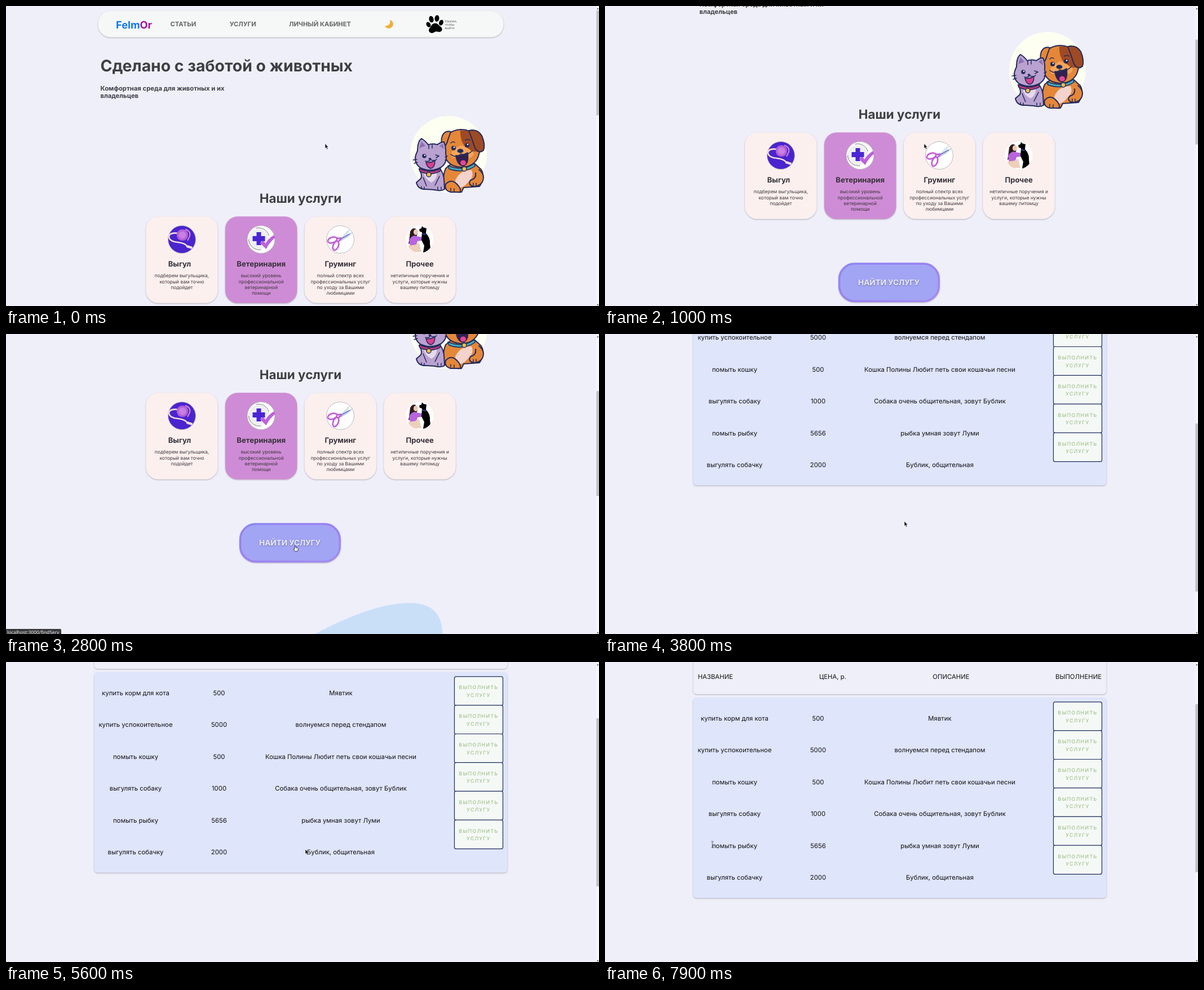
An HTML page that plays this animation: 1052x532 px, repeating every 8000 ms.

```html
<!DOCTYPE html>
<html lang="ru">
<head>
<meta charset="utf-8">
<title>Сервис для животных</title>
<style>
@property --s { syntax: "<number>"; inherits: true; initial-value: 0; }
@property --x { syntax: "<number>"; inherits: true; initial-value: 566; }
@property --y { syntax: "<number>"; inherits: true; initial-value: 244; }

html, body { margin: 0; width: 100%; height: 100%; overflow: hidden; background: #efeffa; }
svg { display: block; width: 1052px; height: 532px; animation: scroll 8s step-end infinite, point 8s step-end infinite; }
text { font-family: Inter, sans-serif; text-rendering: geometricPrecision; }
.b { font-weight: 700; }
.m { text-anchor: middle; }
.page { transform: translateY(calc(var(--s) * -1px)); }
.cursor { transform: translate(calc(var(--x) * 1px), calc(var(--y) * 1px)); }
.card { filter: drop-shadow(0 1.8px 1.1px #0004); }
.ink { stroke: #212a5c; stroke-width: 2; stroke-linejoin: round; stroke-linecap: round; }
.thin { stroke-width: 1.5; }
.line { fill: none; }
#home, #list, #arrow, #hand, #beam, #status { animation: 8s step-end infinite; }
#home { animation-name: home; }
#list { animation-name: list; }
#arrow { animation-name: arrow; }
#hand { animation-name: hand; }
#beam { animation-name: beam; }
#status { animation-name: status; }
#home .thumb { transform: translateY(calc(var(--s) * .3465px)); }
#list .thumb { transform: translateY(calc(var(--s) * .56px)); }

/* the picture advances in 100 ms ticks */
@keyframes scroll {
  0% { --s: 0; }
  8.75% { --s: 0; animation-timing-function: steps(4, start); }
  13.75% { --s: 149; }
  15% { --s: 149; animation-timing-function: steps(4, start); }
  20% { --s: 269; }
  51.25% { --s: 269; animation-timing-function: steps(5, start); }
  57.5% { --s: 179; }
  70% { --s: 179; animation-timing-function: steps(4, start); }
  75%, 100% { --s: 119; }
}
@keyframes point {
  0% { --x: 566; --y: 244; }
  20% { --x: 566; --y: 244; animation-timing-function: steps(4, start); }
  25% { --x: 536; --y: 408; }
  26.25% { --x: 536; --y: 408; animation-timing-function: steps(3, start); }
  30% { --x: 513; --y: 375; }
  45% { --x: 513; --y: 375; animation-timing-function: steps(3, start); }
  48.75% { --x: 531; --y: 332; }
  92.5% { --x: 531; --y: 332; animation-timing-function: steps(3, start); }
  96.25% { --x: 370; --y: 288; animation-timing-function: steps(3, start); }
  100% { --x: 190.5; --y: 323.5; }
}
@keyframes home { 0% { visibility: visible; } 37.5%, 100% { visibility: hidden; } }
@keyframes list { 0% { visibility: hidden; } 37.5%, 100% { visibility: visible; } }
@keyframes arrow {
  0%, 37.5%, 90% { opacity: 1; }
  26.25%, 77.5%, 98.75%, 100% { opacity: 0; }
}
@keyframes hand { 0%, 37.5%, 100% { opacity: 0; } 26.25% { opacity: 1; } }
@keyframes beam { 0%, 90% { opacity: 0; } 77.5%, 98.75%, 100% { opacity: 1; } }
@keyframes status {
  0%, 42.5%, 100% { opacity: 0; }
  26.25%, 41.25% { opacity: .5; }
  27.5% { opacity: 1; }
}
</style>
</head>
<body>
<svg viewBox="0 0 1052 532">
  <defs>
    <linearGradient id="rim" x1="0" y1="0" x2="1" y2="1">
      <stop stop-color="#8c87f3"/><stop offset=".5" stop-color="#9c80f2"/><stop offset="1" stop-color="#a48cf2"/>
    </linearGradient>
    <clipPath id="disc"><circle r="24"/></clipPath>
  </defs>
  <rect width="1052" height="532" fill="#efeffa"/>

  <g id="home">
    <g class="page">
      <rect class="card" x="163.5" y="9" width="719" height="46.5" rx="22" fill="#f5f8f6"/>
      <text class="b" x="195" y="39.5" font-size="18.2" fill="#1479e6">Felm<tspan fill="#a3109f">Or</tspan></text>
      <g id="nav" fill="#666668"></g>
      <path d="M681 24.6A7.7 7.7 0 1 1 672 35C678 36.5 683.5 31 681 24.6Z" fill="#f3ae38"/>
      <g id="paw">
        <path d="M759 31C764 29 767 33 770 36C776 39 774 47 768 46C764 45 762 45 759 47C753 50 748 45 751 40C754 37 754 33 759 31Z"/>
        <ellipse cx="749.5" cy="33" rx="3.6" ry="5" transform="rotate(-30 749.5 33)"/>
        <ellipse cx="754.5" cy="23.5" rx="4" ry="5.8" transform="rotate(-14 754.5 23.5)"/>
        <ellipse cx="764.5" cy="22" rx="4" ry="5.8" transform="rotate(6 764.5 22)"/>
        <ellipse cx="772" cy="29.5" rx="3.7" ry="5.2" transform="rotate(24 772 29.5)"/>
      </g>

      <g id="pets">
        <circle cx="785" cy="263" r="68" fill="#fdfff1"/>
        <path class="ink" d="M780 288C774 302 775 320 782 326Q790 331 808 330L812 322L840 320Q851 304 843 290L832 280H790Z" fill="#e58738"/>
        <path d="M797 309Q806 290 826 291Q831 303 820 312Q810 325 799 322Z" fill="#f3d3cc"/>
        <path class="ink" d="M780 316Q790 305 801 317Q807 323 806 330H789Q777 327 780 316ZM839 290Q851 300 845 312Q840 320 829 320Q819 317 824 309Q835 306 833 296" fill="#e58738"/>
        <path class="ink line thin" d="M789 323v5M795 324v5M829 314v5M834 314v4"/>
        <path class="ink" d="M777 241Q782 221 806 219Q828 219 837 236Q844 255 836 271Q827 286 808 286Q787 285 780 270Q773 254 777 241Z" fill="#e58738"/>
        <path d="M806 221Q828 219 835 236Q840 248 837 258Q824 260 814 249Q805 237 806 221Z" fill="#9e4a25"/>
        <path class="ink" d="M821 221Q836 217 844 230Q851 246 847 256Q839 263 832 252Q827 236 821 221Z" fill="#9e4a25"/>
        <path class="ink" d="M789 223Q779 220 774 230Q770 241 776 250Q782 247 784 237Z" fill="#e58738"/>
        <path d="M806 247Q818 249 830 261Q828 271 815 270L807 264L793 270Q786 264 794 255Z" fill="#f4a65a"/>
        <path class="ink thin" d="M798 265Q809 266 819 260Q822 280 811 284Q800 282 798 265Z" fill="#322050"/>
        <ellipse cx="811" cy="278" rx="5" ry="4.5" fill="#e8459a"/>
        <path class="ink line thin" d="M789 263Q798 271 807 262Q816 267 827 257M789 243q4-4 7-1M815 238q5-3 8 0"/>
        <ellipse cx="806" cy="257" rx="5.5" ry="3.7" fill="#212a5c"/>
        <circle cx="794" cy="252" r="4" fill="#212a5c"/><circle cx="818" cy="247" r="4" fill="#212a5c"/>
        <circle cx="795" cy="250.5" r="1.3" fill="#fff"/><circle cx="819" cy="245.5" r="1.3" fill="#fff"/>
        <path class="ink thin" d="M784 283Q811 294 831 279L832 284Q812 298 786 289Z" fill="#43a8bb"/>
        <circle class="ink thin" cx="813" cy="289" r="4" fill="#f5bd45"/>

        <path class="ink" d="M733 290Q739 299 736 306L728 313Q731 326 746 325L761 326Q772 329 778 325L777 306Q775 295 771 290Z" fill="#b9a2cf"/>
        <path d="M741 296Q753 302 764 296Q765 307 755 313Q743 307 741 296Z" fill="#e5d9ee"/>
        <path class="ink line thin" d="M740 304l6 15M769 302l-8 16M737 320v4M742 321v4M766 321v4M772 321v4"/>
        <path class="ink" d="M730 257Q730 240 737 235Q744 239 749 246Q757 243 765 246Q771 241 777 241Q781 250 780 262Q784 277 772 286Q753 296 735 287Q720 276 730 257Z" fill="#b9a2cf"/>
        <path d="M733 252L737 240L744 248ZM769 248L775 244L777 254Z" fill="#8d70b1"/>
        <path class="ink line thin" d="M750 247v6M756 246v6M722 273l7-1M724 279l6-2M779 268l4-2M779 273l4 1M762 264l6 2-5 3M744 275Q750 277 753 272Q758 276 764 272"/>
        <circle cx="742" cy="266" r="3.7" fill="#212a5c"/><circle cx="743" cy="264.8" r="1.2" fill="#fff"/>
        <path class="ink thin" d="M745 277Q753 279 761 274Q761 286 754 288Q747 287 745 277Z" fill="#d9408f"/>
        <ellipse cx="752" cy="271" rx="2.5" ry="1.7" fill="#212a5c"/>
        <path class="ink thin" d="M733 288Q753 298 771 288L770 293Q752 302 734 293Z" fill="#c63b7a"/>
        <circle class="ink thin" cx="750" cy="299" r="4" fill="#f5bd45"/>
      </g>

      <g id="heads" fill="#3f3f43"></g>
      <g id="cards"></g>

      <g transform="translate(312 414)">
        <circle r="24.5" fill="#4a24cf" stroke="#b9b9bd"/>
        <path d="M-6-11Q-23-13-23-4Q-21 4-7 5Q7 7 9 12L17 15" fill="none" stroke="#f4dcd7" stroke-width="2.6"/>
        <path d="M10 10l9 3-1 4-10-3z" fill="#f4dcd7"/>
        <path d="M6-18q10 3 8 12l-4 8" fill="none" stroke="#d28bd6" stroke-width="2"/>
        <rect x="-9" y="-18" width="20" height="20" rx="9" fill="#b45fd8"/>
        <circle cx="1" cy="-8" r="6.5" fill="#c780df"/>
      </g>
      <g transform="translate(452.5 414)">
        <circle r="24.5" fill="#fff" stroke="#b9b9bd"/>
        <circle cx="-4" cy="-1" r="18" fill="#efeff1"/>
        <path d="M-9-20A19 19 0 0 1 14-7M-22 0A19 19 0 0 0 0 18" fill="none" stroke="#77777c"/>
        <path d="M-8-13H0V-6H7V3H0V10H-8V3H-15V-6H-8Z" fill="#4925d6"/>
        <path d="M-2 6L4 2L8 7Q13-2 23-8L25-3Q15 5 9 17Z" fill="#bd62da"/>
      </g>
      <g transform="translate(593 414)">
        <circle r="24.5" fill="#fff" stroke="#b9b9bd"/>
        <path d="M-2 2Q7-11 18-20Q14-6 1 4Z" fill="#d8e5ec"/>
        <path d="M-3-3Q10-6 23-14Q14-2 0 2Z" fill="#b9cde0"/>
        <path d="M1-1L17-10" stroke="#5037c7"/>
        <g fill="none" stroke="#c25fda" stroke-width="2.8">
          <ellipse cx="-14" cy="1" rx="8.5" ry="4.8" transform="rotate(-18 -14 1)"/>
          <ellipse cx="-8" cy="11" rx="8.5" ry="4.6" transform="rotate(-68 -8 11)"/>
          <path d="M-6-2L2-2M-4 4L2-1"/>
        </g>
      </g>
      <g transform="translate(734 414)">
        <circle r="24.5" fill="#fff"/>
        <g clip-path="url(#disc)">
          <path d="M-17-14Q-13-22-7-19L-4-10L-8 1L-20 8Q-18-4-17-14Z" fill="#2b1c22"/>
          <ellipse cx="-7" cy="-13" rx="4" ry="5" fill="#f1c9b3"/>
          <path d="M-19 1Q-13-9-6-6L4-4L3 2L-4 3L-6 11L-17 12Z" fill="#b764dd"/>
          <path d="M-20 11L-6 9L-1 22L-19 24ZM-7 8L-1 6L3 22H-2Z" fill="#ecd0bb"/>
          <path d="M-1-18L3-20L4-24L7-21L12-20L11-11Q19-3 18 8L20 23H6L8 11L3 1L4-13L0-14Z"/>
          <path d="M4-10l7 1" stroke="#5648c2" stroke-width="1.5"/>
        </g>
      </g>

      <path d="M510 822C575 784 655 746 715 746C758 746 774 767 774 801V822Z" fill="#c9dff8"/>
      <rect class="card" x="415.7" y="606" width="176.5" height="66.5" rx="27" fill="#a2a5f4" stroke="url(#rim)" stroke-width="3.5"/>
      <text class="b m" x="503.5" y="644" font-size="13.55" fill="#ebebf6" style="filter:drop-shadow(0 1.5px 1px #0005)">НАЙТИ УСЛУГУ</text>
    </g>
    <rect x="1047" width="5" height="532" fill="#f5f5f6"/>
    <rect class="thumb" x="1047.3" y="8" width="4.7" height="186" fill="#c1c1c2"/>
  </g>

  <g id="list">
    <g class="page">
      <rect class="card" x="156.5" y="40" width="733" height="136" rx="6" fill="#efeffa"/>
      <rect class="card" x="156.5" y="182" width="733" height="355.5" rx="6" fill="#dfe5fb"/>
      <g id="rows" font-size="11.35" fill="#111"></g>
    </g>
    <rect x="1047" width="5" height="532" fill="#f5f5f6"/>
    <rect class="thumb" x="1047.3" y="8" width="4.7" height="298" fill="#c1c1c2"/>
  </g>

  <path d="M1048 6l1.8-2.5 1.8 2.5ZM1048 529l1.8 2.5 1.8-2.5Z" fill="#555"/>

  <g id="status">
    <path d="M0 523H96Q98 523 98 525V532H0Z" fill="#3b3a3e"/>
    <text x="2" y="531.7" font-size="8.4" fill="#e9e9e9" style="font-family:'Noto Sans',sans-serif">localhost:3000/findServ</text>
  </g>

  <g class="cursor">
    <path id="arrow" d="M0 0V8.6L2 6.9L3.4 10.2L5 9.5L3.6 6.3H6Z" fill="#111" stroke="#fff" stroke-width=".6"/>
    <path id="hand" d="M-1 1Q0-.5 1 1V4Q5 3.8 5.2 5.5V8L4 10.2H-.5L-3 6.5Q-2.5 5-1 6.5Z" fill="#fff" stroke="#111" stroke-width=".8"/>
    <path id="beam" d="M-2-5.5Q0-5.5 0-4.5Q0-5.5 2-5.5M0-4.5V4.5M-2 5.5Q0 5.5 0 4.5Q0 5.5 2 5.5" fill="none" stroke="#444" stroke-width=".9"/>
  </g>
</svg>
<script>
const put = (id, html) => { document.getElementById(id).innerHTML = html; };
const text = (x, y, str, size, cls = "", more = "") =>
  `<text x="${x}" y="${y}" class="${cls}" ${size ? `font-size="${size}"` : ""} ${more}>${str}</text>`;

put("nav",
  [[291.5, "СТАТЬИ"], [396.7, "УСЛУГИ"], [502, "ЛИЧНЫЙ КАБИНЕТ"]].map(([x, s]) => text(x, 36.2, s, 11.25, "b")).join("") +
  ["Нажми,", "чтобы", "выйти"].map((s, i) => text(778.5, 28.6 + i * 6, s, 5.8)).join(""));

put("heads",
  text(167.5, 115.8, "Сделано с заботой о животных", 28.35, "b") +
  text(167.5, 149.8, "Комфортная среда для животных и их", 11.27, "b") +
  text(167.5, 163.3, "владельцев", 11.27, "b") +
  text(522.5, 349, "Наши услуги", 22.4, "b m"));

const cards = [
  ["Выгул", "подберем выгульщика,", "который вам точно", "подойдет"],
  ["Ветеринария", "высокий уровень", "профессиональной", "ветеринарной", "помощи"],
  ["Груминг", "полный спектр всех", "профессиональных услуг", "по уходу за Вашими", "любимцами"],
  ["Прочее", "нетипичные поручения и", "услуги, которые нужны", "вашему питомцу"],
];
put("cards", cards.map(([title, ...lines], i) => {
  const x = 312 + i * 140.7;
  return `<rect class="card" x="${x - 63.8}" y="373.3" width="127.5" height="153.5" rx="22" fill="${i == 1 ? "#cf8cd6" : "#fbf0ee"}"/>` +
    text(i ? x : x - 4, 462.4, title, 13.1, "b m", 'fill="#37323a"') +
    lines.map((s, n) => text(x, 481.4 + n * 10.2, s, 8.45, "m", 'fill="#3c373d"')).join("");
}).join(""));

const jobs = [
  ["купить корм для кота", 500, "Мявтик"],
  ["купить успокоительное", 5000, "волнуемся перед стендапом"],
  ["помыть кошку", 500, "Кошка Полины Любит петь свои кошачьи песни"],
  ["выгулять собаку", 1000, "Собака очень общительная, зовут Бублик"],
  ["помыть рыбку", 5656, "рыбка умная зовут Луми"],
  ["выгулять собачку", 2000, "Бублик, общительная"],
];
put("rows",
  text(164.7, 149.3, "НАЗВАНИЕ") + text(404, 149.3, "ЦЕНА, р.", 0, "m") +
  text(614, 149.3, "ОПИСАНИЕ", 0, "m") + text(840, 149.3, "ВЫПОЛНЕНИЕ", 0, "m") +
  jobs.map((job, i) => {
    const top = 189.8 + i * 50.85;
    const label = (y, s) => text(838.5, top + y, s, 8.77, "m", 'fill="#8fb676" letter-spacing="1.35"');
    return [230, 378, 594].map((x, n) => text(x, 222.7 + i * 56.5, job[n], 0, "m")).join("") +
      `<rect x="795.5" y="${top}" width="86" height="51.4" rx="3" fill="#f5f9f6" stroke="#1d2b5c" stroke-width="1.2"/>` +
      label(22.5, "ВЫПОЛНИТЬ") + label(36.1, "УСЛУГУ");
  }).join(""));
</script>
</body>
</html>
```
